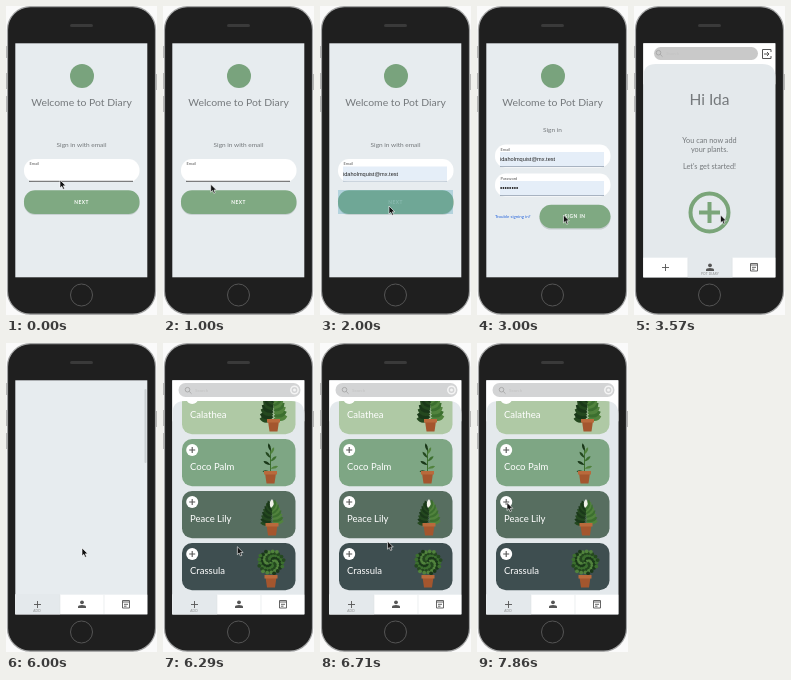
Recreate the animation shown at these times as an HTML page. Size 151 by 309 pixels, loop 8000 ms.

```html
<!DOCTYPE html>
<html lang="en">
<meta charset="utf-8">
<title>Plant app</title>
<style>
  html, body { margin: 0; width: 100%; height: 100%; overflow: hidden; background: #fafafa; }
  svg { display: block; width: 151px; height: 309px; font-family: Lato, sans-serif; fill: #74787b; }
  .mid { text-anchor: middle; }
  .label { font-size: 4px; fill: #555; }
  .value { font: 5.6px 'Liberation Sans', sans-serif; fill: #222; }
  .button { font-size: 4.8px; font-weight: 700; letter-spacing: .5px; fill: #fff; }
  .name { font-size: 9.5px; fill: #fff; }
  .tab { font-size: 3.2px; letter-spacing: .2px; fill: #888; }
  .line { fill: none; stroke: #555; }
</style>
<svg viewBox="0 0 151 309">
  <defs>
    <clipPath id="list"><path d="M9 251V71Q9 58 22 58H128Q141 58 141 71V251Z"/></clipPath>
  </defs>

  <path d="M.7 40V52M.7 67V83M.7 90V106M150.300 68V84" stroke="#aaa"/>
  <rect x="1.500" y=".7" width="148" height="307.500" rx="23" fill="#1f1f1f" stroke="#a2a3a3" stroke-width="1.200"/>
  <rect x="64" y="18" width="23" height="3" rx="1.500" fill="#3a3a3a"/>
  <circle cx="75.500" cy="289" r="11" fill="#1e1e1e" stroke="#555"/>
  <rect x="9.300" y="37.300" width="132" height="234" fill="#e7ecef"/>

  <g id="welcome">
    <circle cx="76" cy="70" r="12" fill="#79a37d"/>
    <text class="mid" x="75.500" y="100" font-size="10.4">Welcome to Pot Diary</text>
  </g>
  <g id="email">
    <text class="mid" x="75.500" y="141" font-size="6.5">Sign in with email</text>
    <rect x="18" y="153" width="115.500" height="23" rx="11" fill="#fff"/>
    <g id="filled">
      <rect x="23" y="160.500" width="104" height="14" fill="#e5eef8"/>
      <text class="value" x="23" y="170">idaholmquist@mx.test</text>
    </g>
    <text class="label" x="23.500" y="159">Email</text>
    <path id="underline" d="M23 175.300H127" stroke-width=".8"/>
    <rect x="18" y="185" width="115.500" height="24" rx="11" fill="#c8d1d2"/>
    <rect x="18" y="184.300" width="115.500" height="23.700" rx="11" fill="#7fa982"/>
    <text class="button mid" id="next" x="75.500" y="197.700">NEXT</text>
    <rect id="press" x="18" y="184" width="115" height="24" fill="#50a4bb" opacity=".35"/>
  </g>
  <g id="password">
    <text class="mid" x="75.500" y="126" font-size="6.500">Sign in</text>
    <g id="fields"></g>
    <text x="18" y="212" font-size="4.400" fill="#2463db">Trouble signing in?</text>
    <rect x="62.500" y="200.500" width="71" height="23" rx="11.500" fill="#c6cecf"/>
    <rect x="62.500" y="198.700" width="71" height="23.500" rx="11.700" fill="#7fa982"/>
    <text class="button mid" x="98" y="212">SIGN IN</text>
  </g>

  <g id="header">
    <rect x="9.300" y="37.300" width="132" height="41" fill="#fff"/>
    <path d="M9.300 271.300V71Q9.300 58 22 58H128Q141.300 58 141.300 71V271.300Z" fill="#e4e9ec"/>
  </g>
  <g id="home">
    <rect x="20" y="41" width="104" height="13" rx="6.500" fill="#c9c9c9"/>
    <path class="line" d="M132 43.500H128.500V52.500H137V50M137 46V43.500H132M130 48H135M133 46l2 2l-2 2"/>
    <g class="mid">
      <text x="75.500" y="99" font-size="15.500">Hi Ida</text>
      <g font-size="7.300">
        <text x="75.500" y="137">You can now add</text>
        <text x="75.500" y="146">your plants.</text>
        <text x="75.500" y="163">Let's get started!</text>
      </g>
    </g>
    <circle cx="75.500" cy="206.500" r="19" fill="none" stroke="#7aa579" stroke-width="4"/>
    <path d="M65 206.500H86M75.500 196V217" stroke="#7aa579" stroke-width="4"/>
  </g>
  <g id="plants">
    <g id="cards" clip-path="url(#list)"></g>
    <rect x="15.500" y="40" width="122" height="14" rx="7" fill="#d3d4d5"/>
    <circle cx="131.500" cy="47" r="3.700" fill="none" stroke="#f4f4f4" stroke-width="1.500"/>
    <circle cx="131.500" cy="47" r="1.500" fill="#f4f4f4"/>
  </g>
  <g id="search" fill="none" stroke="#a6a6a6" stroke-width=".9">
    <circle cx="24.500" cy="46.700" r="2.300"/><path d="M26.200 48.400l2.300 2.300"/>
    <text x="32" y="49" font-size="4.500" fill="#c3c3c3" stroke="none">Search</text>
  </g>
  <rect id="scrollbar" x="138.500" y="46" width="2" height="74" rx="1" fill="#cbd0d3"/>

  <g id="tabs">
    <rect x="9.300" y="251.700" width="132" height="19.600" fill="#fff"/>
    <rect id="active" y="251" width="44.700" height="20.300" fill="#e4e9ec"/>
    <path d="M54 252V271M98 252V271" stroke="#e0e4e6" stroke-width=".6"/>
    <path class="line" d="M28 261.500h7m-3.500-3.500v7" stroke-width=".9"/>
    <circle cx="76" cy="259.300" r="1.900" fill="#555"/>
    <path d="M72 265v-1.200q0-1.800 4-1.800t4 1.800v1.200z" fill="#555"/>
    <path class="line" d="M116.500 257.500h7v7.500h-7zM116.500 259h7M118 261.300h4M118 263.200h2.500" stroke-width=".9"/>
    <text class="tab mid" id="tabName" y="269"></text>
  </g>

  <path id="cursor" d="M0 0V8L1.800 6.300L3.100 9.300L4.500 8.700L3.300 5.800H5.800Z" fill="#111" stroke="#fff" stroke-width=".6"/>
</svg>
<script>
const $ = id => document.getElementById(id);
const show = (id, on) => $(id).style.display = on ? '' : 'none';

const field = (y, label, value, size) => `
  <rect x="18" y="${y}" width="115.500" height="23" rx="11" fill="#fff"/>
  <rect x="23" y="${y + 7.5}" width="104" height="14" fill="#e5eef8"/>
  <text class="label" x="23.500" y="${y + 6}">${label}</text>
  <text class="value" x="23" y="${y + 16.5}" style="font-size:${size}px">${value}</text>
  <path d="M23 ${y + 22}H127" stroke="#8392a6" stroke-width=".7"/>`;
$('fields').innerHTML = field(138.5, 'Email', 'idaholmquist@mx.test', 5.6)
  + field(167.5, 'Password', '••••••••', 6.5);

const greens = ['#24481f', '#3c6f2f', '#1a3819', '#51833d'];

// Leaves alternate left and right up a stem, steeper towards the tip
const stem = (count, height, length, width) => Array.from({ length: count }, (_, i) => {
  const p = i / (count - 1), angle = (i % 2 ? 1 : -1) * (85 - 70 * p);
  return `<path transform="translate(0 ${-height * p}) rotate(${angle})" fill="${greens[i * 3 % 4]}"
    d="M0 0Q${-width} ${-length * .6} 0 ${-length}Q${width} ${-length * .6} 0 0"/>`;
}).join('');
const bush = Array.from({ length: 70 }, (_, i) => {
  const a = i * 2.4, r = Math.sqrt(i / 70);
  return `<circle cx="${Math.cos(a) * r * 13}" cy="${Math.sin(a) * r * 12 - 14}" r="1.9" fill="${greens[i * 7 % 4]}"/>`;
}).join('');
const stalk = '<path d="M0 0V-24" stroke="#3c6f2f"/>';
const flower = '<path d="M-1-16Q-4-21 0-25Q4-20-1-16" fill="#f1f2e9"/>';

const cards = [
  ['Calathea', '#afc9a5', 110.5, stem(16, 18, 14, 7)],
  ['Coco Palm', '#7ea684', 107.5, stalk + stem(7, 21, 8, 2.5)],
  ['Peace Lily', '#576e60', 109, stem(16, 13, 12, 5) + flower],
  ['Crassula', '#3e4e50', 108, bush]
];
$('cards').innerHTML = cards.map(([name, color, x, leaves], i) => `
  <g transform="translate(0 ${44 + i * 52})">
    <rect x="19" width="113.500" height="47.300" rx="10" fill="${color}"/>
    <circle cx="29.200" cy="11" r="6" fill="#fff"/>
    <path d="M26.200 11h6m-3-3v6" stroke="#555" stroke-width="1.100"/>
    <text class="name" x="27" y="31">${name}</text>
    <g transform="translate(${x} 33)">${leaves}
      <path d="M-5.500 1H5.500L4 11.500H-4Z" fill="#a4562e"/>
      <path d="M-6.500-1H6.500V2.500H-6.500Z" fill="#b96a3c"/>
    </g>
  </g>`).join('');

// Pointer stops: time, x, y
const stops = [
  [0, 54, 174], [570, 46, 168], [1140, 48, 180], [1710, 69, 200], [2140, 69, 200],
  [2860, 86.5, 209], [4700, 86.5, 209], [5430, 76, 205], [6140, 76, 205], [6710, 66, 197],
  [6860, 66, 196], [7710, 30, 159.5], [8000, 30, 159.5]
];
function pointer(t) {
  const i = stops.findIndex(s => s[0] > t), [t0, x0, y0] = stops[i - 1], [t1, x1, y1] = stops[i];
  const p = (t - t0) / (t1 - t0), e = p * p * (3 - 2 * p);
  return [x0 + (x1 - x0) * e, y0 + (y1 - y0) * e];
}

function draw(now) {
  // Seven pictures a second
  const t = Math.floor((now % 8000 + 3) * 7 / 1000) * 1000 / 7 % 8000;
  const home = t >= 3420 && t < 5700, adding = t >= 5700, listed = t >= 6140;
  show('welcome', t < 3420);
  show('email', t < 2280);
  show('password', t >= 2280 && t < 3420);
  show('filled', t >= 1140);
  $('underline').setAttribute('stroke', t < 1140 ? '#333' : '#aebccb');
  show('press', t >= 1990);
  $('next').style.opacity = t >= 1990 ? .3 : 1;
  show('header', home || listed);
  show('search', home || listed);
  show('home', home);
  show('plants', listed);
  show('scrollbar', adding && !listed);
  show('tabs', home || adding);
  $('active').setAttribute('x', adding ? 9.3 : 53.7);
  $('tabName').setAttribute('x', adding ? 31 : 76);
  $('tabName').textContent = adding ? 'ADD' : 'POT DIARY';
  $('cursor').setAttribute('transform', `translate(${pointer(t)})`);
  requestAnimationFrame(() => draw(performance.now() - start));
}
const start = performance.now();
draw(0);
</script>
</html>
```
